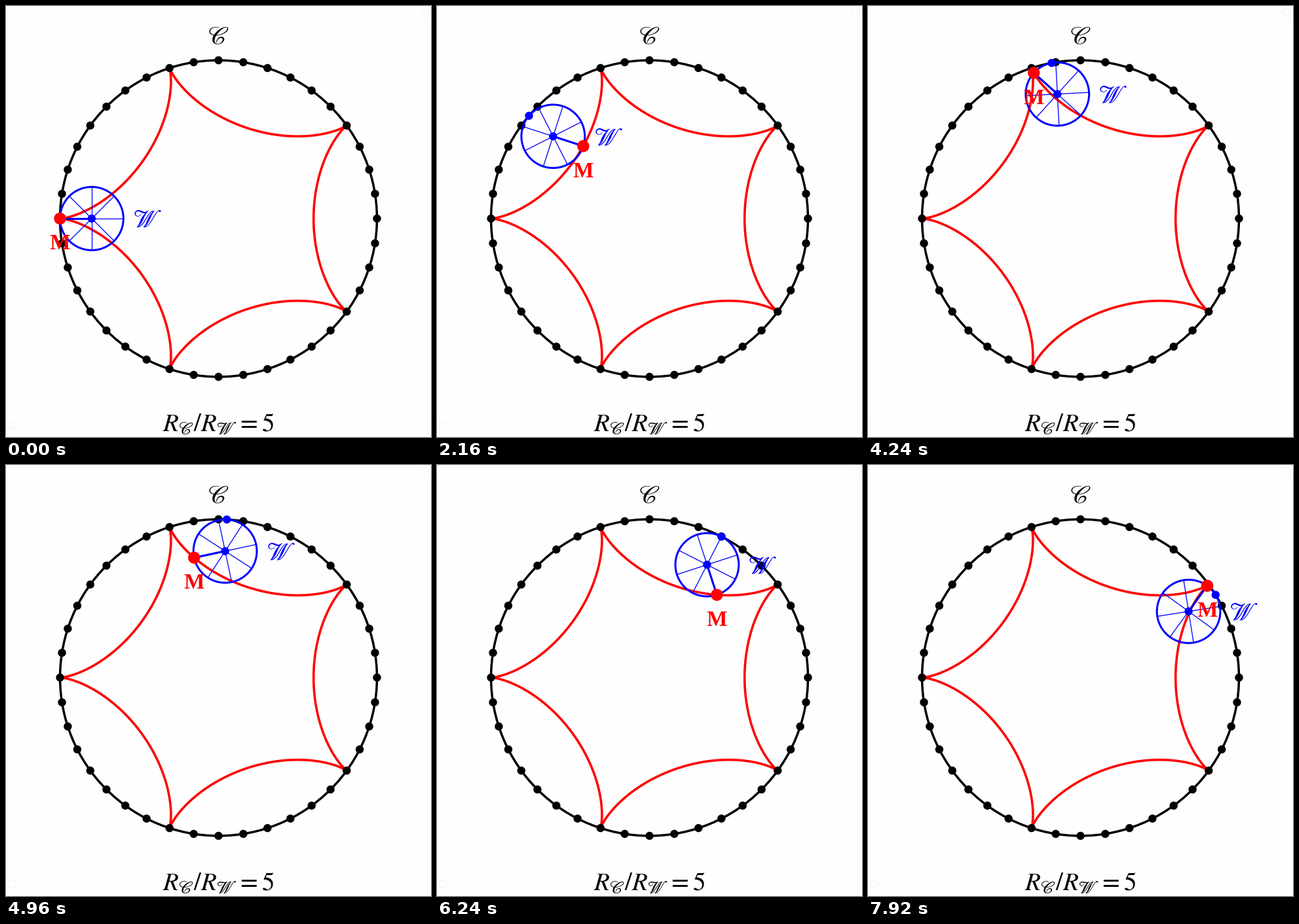
Recreate the animation shown at these times as a matplotlib script. Size 649x659 px, loop 8000 ms.

```python
import numpy as np
import matplotlib.pyplot as plt
from matplotlib.animation import FuncAnimation
from matplotlib.patches import Circle

WIDTH, HEIGHT, DPI = 649, 659, 100
FRAMES, INTERVAL = 100, 80
CENTER = np.array([324.5, 325.0])
RATIO = 5
R = 242.0
r = R / RATIO
STEP = np.radians(1.5)  # advance of the wheel around the ring per frame

plt.rcParams["mathtext.fontset"] = "stix"

fig = plt.figure(figsize=(WIDTH / DPI, HEIGHT / DPI), dpi=DPI, facecolor="#fefefe")
ax = fig.add_axes([0, 0, 1, 1])
ax.set_xlim(0, WIDTH)
ax.set_ylim(HEIGHT, 0)
ax.axis("off")


def px(width):
    return width * 72 / DPI


def polar(radius, angle):
    """Offset with y pointing down; angles run counter-clockwise."""
    return np.array([radius * np.cos(angle), -radius * np.sin(angle)])


def wheel_center(t):
    return CENTER + polar(R - r, np.pi - t)


def rim_angle(t):
    return np.pi + (RATIO - 1) * t


def disc(xy, radius, color, z):
    return ax.add_patch(Circle(xy, radius, fc=color, ec="none", zorder=z))


def ring(xy, radius, color, width, z):
    return ax.add_patch(Circle(xy, radius, fc="none", ec=color, lw=px(width), zorder=z))


def label(x, y, text, size, color="black", **kw):
    return ax.text(x, y, text, size=size, color=color, ha="center",
                   va="baseline", zorder=9, **kw)


# Fixed parts: corner marks, ring with pegs, hypocycloid, captions
for corner in (315, -315), (-315, 315):
    ring(CENTER + corner, 6, "#f4f4f4", 1, 1)

ring(CENTER, R, "black", 3.5, 2)
for k in range(40):
    disc(CENTER + polar(R, k * np.pi / 20), 6.2, "black", 3)

t = np.linspace(0, 2 * np.pi, 1001)
curve = CENTER[:, None] + polar(R - r, np.pi - t) + polar(r, rim_angle(t))
ax.plot(*curve, color="red", lw=px(3.6), solid_joinstyle="round", zorder=2.5)

label(CENTER[0], 58, r"$\mathscr{C}$", 28)
label(CENTER[0], 650, r"$R_{\mathscr{C}}/R_{\mathscr{W}}=5$", 28)

# Moving parts
rim = ring(CENTER, r, "blue", 3, 4)
spokes = [ax.plot([], [], color="blue", lw=px(3.2 if k == 0 else 1.3), zorder=4)[0]
          for k in range(8)]
hub = disc(CENTER, 6.2, "blue", 5)
contact = disc(CENTER, 6.2, "blue", 5)
marker = disc(CENTER, 9.2, "red", 6)
wheel_name = label(0, 0, r"$\mathscr{W}$", 28, "blue")
marker_name = label(0, 0, "M", 24, "red", family="Liberation Serif", weight="bold")


def update(frame):
    t = frame * STEP
    c = wheel_center(t)
    angle = rim_angle(t)
    m = c + polar(r, angle)
    for k, spoke in enumerate(spokes):
        spoke.set_data(*zip(c, c + polar(r, angle + k * np.pi / 4)))
    rim.center = hub.center = tuple(c)
    contact.center = tuple(CENTER + polar(R, np.pi - t))
    marker.center = tuple(m)
    wheel_name.set_position(c + (1.75 * r, 13))
    marker_name.set_position(m + (0, 47.5))
    return [rim, *spokes, hub, contact, marker, wheel_name, marker_name]


anim = FuncAnimation(fig, update, frames=FRAMES, interval=INTERVAL,
                     repeat=True, repeat_delay=0)
plt.show()
```
